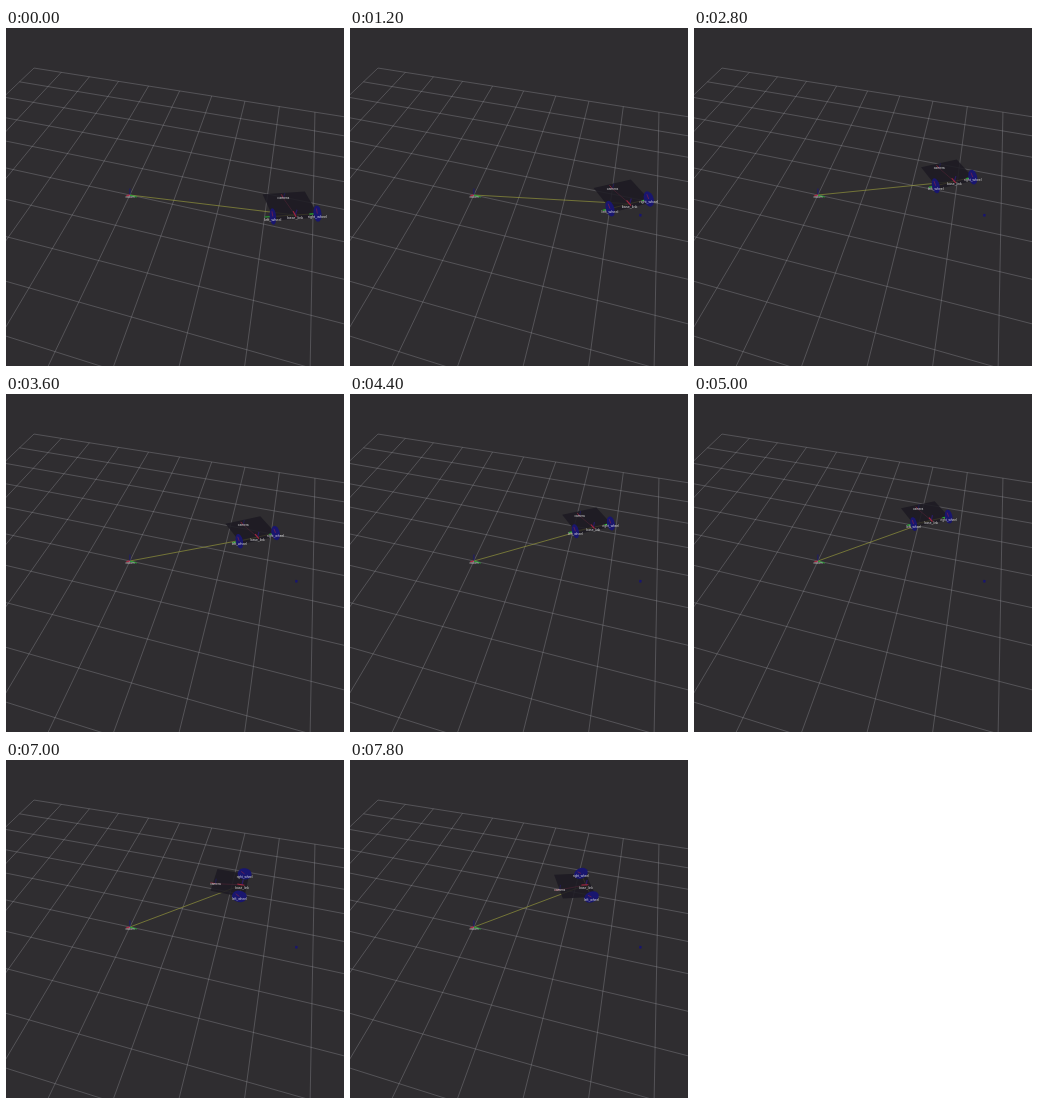
Write an HTML page with a canvas that moves like this. It is 338 px wide and 338 px high and loops after 8000 ms.

```html
<!DOCTYPE html>
<html lang="en">
<head>
<meta charset="utf-8">
<title>Robot frames on a grid</title>
<style>
html, body { margin: 0; width: 100%; height: 100%; overflow: hidden; background: #2f2d30; }
canvas { display: block; width: 100vw; height: 100vh; }
</style>
</head>
<body>
<canvas width="338" height="338"></canvas>
<script>
const ctx = document.querySelector('canvas').getContext('2d');
const LOOP = 8, STEP = .2;                 // seconds
const DRIVE_START = .46, DRIVE_END = 5.13;
const SPEED = .505, TURN_RATE = .5;        // metres and radians per second
const START = [3.63, .49], START_HEADING = 1.97;
const HALF_TRACK = .5, WHEEL_RADIUS = .18;
const NAVY = '#19166f', RED = '#a5253f', GREEN = '#25a832';

const clamp = (v, low, high) => Math.min(high, Math.max(low, v));

// Perspective camera: metres on the ground plane, plus height, to pixels
const depth = (x, y, z) => 1 - .02264 * x + .07036 * y - .0676 * z;

function project([x, y, z = 0]) {
  const w = depth(x, y, z);
  return [
    (123.9 + 38.74 * x + 22.16 * y - 8.38 * z) / w,
    (167 + 5.275 * x - 16.39 * y - 43.5 * z) / w
  ];
}

function line(a, b, color, width = .8) {
  ctx.strokeStyle = color;
  ctx.lineWidth = width;
  ctx.beginPath();
  ctx.moveTo(...project(a));
  ctx.lineTo(...project(b));
  ctx.stroke();
}

function fill(points, color) {
  ctx.fillStyle = color;
  ctx.beginPath();
  points.forEach(point => ctx.lineTo(...project(point)));
  ctx.fill();
}

function label(text, point, drop = 3) {
  const [x, y] = project(point);
  ctx.font = `${3.6 / depth(...point)}px "Liberation Sans", sans-serif`;
  ctx.fillStyle = '#e0e0e0';
  ctx.fillText(text, x, y + drop);
}

function drawGrid() {
  const color = 'rgba(160,160,164,.42)';
  for (let n = -5; n <= 5; n++) {
    line([n, -5], [n, 5], color);
    line([-5, n], [5, n], color);
  }
}

// Turn on the spot, drive straight, then turn on the spot again.
// Returns a function from robot coordinates (forward, left, up) to the world.
function robotFrame(t) {
  const turning = Math.min(t, DRIVE_START) + Math.max(0, t - DRIVE_END);
  const heading = START_HEADING + TURN_RATE * turning;
  const course = START_HEADING + TURN_RATE * DRIVE_START;
  const distance = SPEED * (clamp(t, DRIVE_START, DRIVE_END) - DRIVE_START);
  const c = Math.cos(heading), s = Math.sin(heading);
  const x = START[0] + distance * Math.cos(course);
  const y = START[1] + distance * Math.sin(course);
  return (forward, left, up = 0) =>
    [x + forward * c - left * s, y + forward * s + left * c, up];
}

function drawWheel(at, side) {
  const left = side * HALF_TRACK;
  line(at(0, left), at(0, left + .18), GREEN, 1.2);
  const rim = Array.from({ length: 16 }, (_, n) => {
    const angle = n * Math.PI / 8;
    return at(WHEEL_RADIUS * Math.cos(angle), left, WHEEL_RADIUS * Math.sin(angle));
  });
  fill(rim, NAVY);
  line(at(0, left), at(.1, left, .06), '#72204c');
}

function drawRobot(t) {
  const at = robotFrame(t);
  const base = at(0, 0), camera = at(.67, 0, -.12);
  const left = at(0, HALF_TRACK), right = at(0, -HALF_TRACK);

  line([0, 0], base, 'rgba(170,172,62,.7)', .8);
  fill([at(.72, .5), at(.72, -.5), at(-.12, -.5), at(-.12, .5)], 'rgba(28,26,34,.86)');
  line(camera, base, '#4d2434', .6);
  line(left, right, 'rgba(125,120,50,.4)', .6);

  drawWheel(at, -1);
  drawWheel(at, 1);

  line(base, at(0, 0, .16), '#2b1c66', 1.2);
  line(at(-.06, 0), at(.12, 0), RED, 1.1);
  line(camera, at(.67, 0, .04), '#231e5c');
  line(camera, at(.8, 0, -.12), RED, .7);

  label('camera', camera, 0);
  label('right_wheel', right);
  label('base_link', base);
  label('left_wheel', left);
}

function drawOrigin() {
  line([0, 0], [0, 0, .2], '#1f1d6c', 1.1);
  line([0, 0], [.17, -.02], GREEN, 1);
  line([0, 0], [-.07, -.05], RED, 1.3);
  label('odom', [0, 0, 0], 1.5);
}

function draw(seconds) {
  const t = Math.floor(seconds % LOOP / STEP + 1e-6) * STEP;
  ctx.fillStyle = '#2f2d30';
  ctx.fillRect(0, 0, 338, 338);
  ctx.textAlign = 'center';
  ctx.textBaseline = 'middle';
  drawGrid();
  line(START, [START[0] + .05, START[1]], NAVY, 2.4);
  drawRobot(t);
  drawOrigin();
}

const begin = performance.now();
function tick(now) {
  draw(Math.max(0, now - begin) / 1000);
  requestAnimationFrame(tick);
}
requestAnimationFrame(tick);
</script>
</body>
</html>
```
